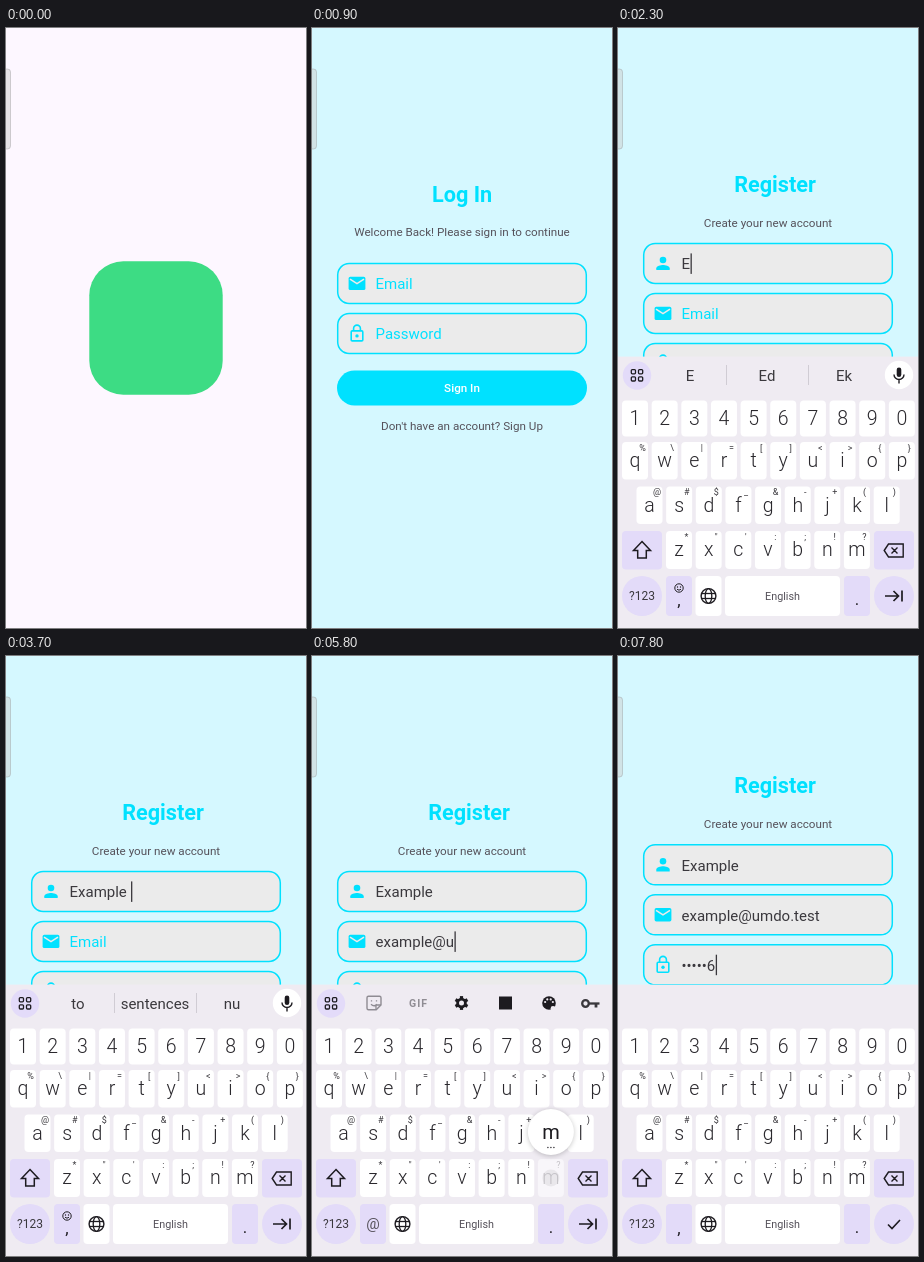
Recreate the animation shown at these times as an HTML page with a canvas. Size 300 px wide and 600 px high, loop 8000 ms.

```html
<!DOCTYPE html>
<html lang="en">
<head>
<meta charset="utf-8">
<title>Sign-up flow</title>
<style>
html, body { margin: 0; width: 100%; height: 100%; overflow: hidden; background: #d5f8ff; }
canvas { display: block; width: 300px; height: 600px; }
</style>
</head>
<body>
<canvas id="stage"></canvas>
<script>
const canvas = document.getElementById('stage');
const c = canvas.getContext('2d');
const dpr = window.devicePixelRatio || 1;
canvas.width = 300 * dpr;
canvas.height = 600 * dpr;

const LOOP = 8000;
const CYAN = '#00e1ff', INK = '#1d1b20', TYPED = '#3a383d', GREY = '#55515a';
const BOARD = '#efebf2', LILAC = '#e3dbf9';
const BOARD_TOP = 328.6;

const ROWS = [
  { keys: '1234567890', hints: '', x: 17, y: 390.3, top: 372.5, h: 36 },
  { keys: 'qwertyuiop', hints: '%\\|=[]<>{}', x: 17, y: 432, top: 414, h: 37.5 },
  { keys: 'asdfghjkl', hints: '@#$_&-+()', x: 31.5, y: 476.6, top: 458.5, h: 37.5 },
  { keys: 'zxcvbnm', hints: '*"\':;!?', x: 61, y: 521, top: 503, h: 38 }
];
const PITCH = 29.65;

// Timed states: [start, value]
const NAME = [[0, ''], [2000, 'E'], [2900, 'Exam'], [3000, 'Examp'], [3400, 'Example ']];
const MAIL = [[0, ''], [4300, 'e'], [4500, 'ex'], [4600, 'exa'], [4800, 'exam'],
  [5000, 'examp'], [5100, 'exampl'], [5200, 'example'], [5500, 'example@'],
  [5800, 'example@u'], [5900, 'example@um'], [6000, 'example@umd'], [6100, 'example@umdo'],
  [6200, 'example@umdo.'], [6300, 'example@umdo.t'], [6400, 'example@umdo.te'],
  [6500, 'example@umdo.test']];
const PASS = [[0, ''], [7100, '1'], [7200, '•2'], [7300, '••'], [7400, '••3'],
  [7500, '•••4'], [7600, '••••5'], [7800, '•••••6']];
const CARET = [[0, -1], [1300, 0], [1500, -1], [1700, 0], [3600, -1], [3700, 0],
  [3900, -1], [4000, 1], [6800, -1], [6900, 2]];
const PRESS = [[0, ''], [1900, 'E'], [2100, ''], [2900, 'p'], [3000, ''], [4200, 'e'], [4300, ''],
  [4400, 'x'], [4500, ''], [4700, 'm'], [4800, ''], [5400, 'a'], [5500, ''], [5600, 'u'],
  [5700, ''], [5800, 'm'], [5900, ''], [6000, 'o'], [6100, ''], [6300, 'e'], [6400, '']];
const STRIP = [[0, 'chip'], [2100, 'E,Ed,Ek'], [2900, 'Exam,Example,Exams'],
  [3400, 'to,sentences,nu'], [4000, 'tools'], [6900, '']];

function at(list, t) {
  let v = list[0][1];
  for (const [start, value] of list) if (t >= start) v = value;
  return v;
}
const clamp = v => Math.max(0, Math.min(1, v));
const ease = v => 1 - Math.pow(1 - clamp(v), 2);

function box(x, y, w, h, r, fill, stroke, lw = 1.5) {
  c.beginPath();
  c.roundRect(x, y, w, h, r);
  paint(fill, stroke, lw);
}
function disc(x, y, r, fill, stroke, lw = 1.5) {
  c.beginPath();
  c.arc(x, y, r, 0, 7);
  paint(fill, stroke, lw);
}
function paint(fill, stroke, lw) {
  if (fill) { c.fillStyle = fill; c.fill(); }
  if (stroke) { c.strokeStyle = stroke; c.lineWidth = lw; c.stroke(); }
}
function line(stroke, lw, ...pts) {
  c.beginPath();
  for (let i = 0; i < pts.length; i += 2) c.lineTo(pts[i], pts[i + 1]);
  paint(null, stroke, lw);
}
function shape(d, x, y, fill, stroke, lw = 1.5) {
  const p = new Path2D(d);
  c.save();
  c.translate(x, y);
  if (fill) { c.fillStyle = fill; c.fill(p); }
  if (stroke) { c.strokeStyle = stroke; c.lineWidth = lw; c.stroke(p); }
  c.restore();
}
function text(s, x, y, size, color, weight = 400, align = 'center') {
  c.font = `${weight} ${size}px Roboto, sans-serif`;
  c.textAlign = align;
  c.fillStyle = color;
  c.fillText(s, x, y + size * 0.355);
}

const fieldIcons = {
  person(x, y) {
    disc(x, y - 3.4, 3.3, CYAN);
    shape('M-6.7 6.7v-1.8c0-2.2 4.4-3.3 6.7-3.3s6.7 1.1 6.7 3.3v1.8z', x, y, CYAN);
  },
  mail(x, y) {
    box(x - 8.4, y - 6.7, 16.8, 13.4, 1.7, CYAN);
    line('#ebebeb', 1.6, x - 7, y - 4.3, x, y + 0.2, x + 7, y - 4.3);
  },
  lock(x, y) {
    box(x - 5.8, y - 2.5, 11.6, 10, 1, null, CYAN, 1.6);
    shape('M-3.4-2.5v-2.4a3.4 3.4 0 0 1 6.8 0v2.4', x, y, null, CYAN, 1.6);
    disc(x, y + 2.5, 1.7, CYAN);
  }
};

function field(y, icon, hint, value, caret) {
  box(25.7, y + 0.5, 248.6, 40, 11.5, '#ebebeb', CYAN);
  const mid = y + 20.9;
  fieldIcons[icon](45, mid - 0.5);
  text(value || hint, 63.5, mid, 15, value ? TYPED : CYAN, 400, 'left');
  if (caret) {
    const x = 64 + c.measureText(value).width;
    c.fillStyle = TYPED;
    c.fillRect(x, mid - 10.5, 1.3, 20.5);
  }
}
function button(y, label) {
  box(25, y, 250, 35, 17.5, CYAN);
  text(label, 150, y + 17.7, 11.67, '#fff', 500);
}

function splash() {
  c.fillStyle = '#fdf7ff';
  c.fillRect(0, 0, 300, 600);
  box(83.3, 233.3, 133.4, 133.4, 34, '#3ddc84');
}
function background() {
  c.fillStyle = '#d5f8ff';
  c.fillRect(0, 0, 300, 600);
}
function login() {
  text('Log In', 150, 166, 21.67, CYAN, 700);
  text('Welcome Back! Please sign in to continue', 150, 204.3, 11.67, GREY);
  field(235, 'mail', 'Email', '');
  field(285, 'lock', 'Password', '');
  button(342.5, 'Sign In');
  text("Don't have an account? Sign Up", 150, 397.5, 11.67, GREY);
}
function register(t) {
  const caret = at(CARET, t);
  c.save();
  c.translate(0, -26.7 * ease((t - 6740) / 160));
  text('Register', 157, 156.5, 21.67, CYAN, 700);
  text('Create your new account', 150, 195, 11.67, GREY);
  field(215, 'person', 'Full name', at(NAME, t), caret === 0);
  field(265, 'mail', 'Email', at(MAIL, t), caret === 1);
  field(315, 'lock', 'Password', at(PASS, t), caret === 2);
  button(372.5, 'Sign Up');
  text('Already have an account? Sign In', 150, 427.5, 11.67, GREY);
  c.restore();
}

function toolIcons() {
  const y = 347, soft = '#8f8c93';
  shape('M-5.5-6.8H5.5Q7-6.8 7-5.3V2L2.2 6.8H-5.5Q-7 6.8-7 5.3V-5.3Q-7-6.8-5.5-6.8z', 62, y, null, soft, 1.4);
  shape('M-3 1.2q3 3 6 0M-2.5-2.8v1.4M2.5-2.8v1.4M2 6.8V2h5', 62, y, null, soft, 1.3);
  c.letterSpacing = '1px';
  text('GIF', 106.5, y + 0.5, 10.5, soft, 700);
  c.letterSpacing = '0px';

  disc(149.5, y, 3.9, null, INK, 2.8);
  for (let i = 0; i < 6; i++) {
    const a = (i + 0.5) * Math.PI / 3, u = Math.cos(a), v = Math.sin(a);
    line(INK, 3.2, 149.5 + 4 * u, y + 4 * v, 149.5 + 6.9 * u, y + 6.9 * v);
  }
  box(187, y - 6.5, 13, 13, 0, INK);

  disc(237, y, 6.8, INK);
  for (let i = 0; i < 4; i++) {
    const a = Math.PI * (1.08 + i * 0.28);
    disc(237 + 4 * Math.cos(a), y + 4 * Math.sin(a), 1.1, BOARD);
  }
  disc(241, y + 5.5, 2.4, BOARD);

  disc(273.5, y + 0.5, 3.3, null, TYPED, 2.3);
  line(TYPED, 2.3, 277, y + 0.5, 287.5, y + 0.5);
  line(TYPED, 2.8, 284, y, 284, y + 4.5);
}

function strip(t) {
  const mode = at(STRIP, t);
  if (!mode) return;
  disc(19, 347.5, 14.2, LILAC);
  for (const dx of [-3.6, 3.6])
    for (const dy of [-3.6, 3.6]) box(16.9 + dx, 345.2 + dy, 4.2, 4.2, 1, null, INK, 1.3);
  if (mode === 'tools') return toolIcons();

  disc(281, 347, 14.2, '#fff');
  box(278.7, 339.5, 4.6, 9.5, 2.3, INK);
  shape('M-5-1a5 5 0 0 0 10 0M0 4v4', 281, 347.5, null, INK, 1.4);

  if (mode === 'chip') {
    const blue = '#12579b';
    box(101, 334, 98, 28, 7, '#dcd8e0');
    disc(115, 348, 6.2, null, blue, 1.4);
    disc(115, 346, 2, null, blue, 1.3);
    shape('M-4 4.3q4-3.4 8 0', 115, 348, null, blue, 1.3);
    text('Nivan Tohal', 128, 348.3, 11.8, TYPED, 400, 'left');
    return;
  }
  if (t >= 3300 && t < 3400) box(110, 333, 78, 29, 7, '#dcd8e0');
  mode.split(',').forEach((word, i) => text(word, 72 + i * 77, 347.5, 15, TYPED));
  for (const x of [108.5, 190.5]) line('#d0ccd4', 1, x, 337, x, 357);
}

function popup(x, y, label) {
  c.save();
  c.shadowColor = 'rgba(0,0,0,.22)';
  c.shadowBlur = 5 * dpr;
  c.shadowOffsetY = dpr;
  disc(x, y, 23, '#fff');
  c.restore();
  text(label, x, y - 0.5, 20, INK);
  for (const dx of [-3, 0, 3]) disc(x + dx, y + 15.5, 0.8, TYPED);
}

function letters(t) {
  const upper = t >= 1700 && t < 2000;
  const press = at(PRESS, t);
  let top = null;
  for (const row of ROWS) {
    [...row.keys].forEach((key, i) => {
      const x = row.x + i * PITCH;
      const down = press && key === press.toLowerCase();
      box(x - 13, row.top, 26, row.h, 4, down ? '#f8f6fa' : '#fff');
      if (down) {
        disc(x, row.y + 1, 8.5, '#e9e7eb');
        top = [x, row.top - 27, t >= 5400 && t < 5500 ? '@' : press];
      }
      text(upper ? key.toUpperCase() : key, x, row.y, 19.5, down ? '#c5c3c8' : '#2a282d', 350);
      if (row.hints) text(row.hints[i], x + 7.5, row.y - 12.3, 9, down ? '#c5c3c8' : TYPED);
    });
  }
  box(4, 503, 40, 38.5, 4, LILAC);
  shape('M0-9L8.5 0H4.3V7.5H-4.3V0H-8.5z', 24, 522.5, upper ? INK : null, INK, 1.5);
  box(256, 503, 40, 38.5, 4, LILAC);
  shape('M-9.8 0L-5.5-6.5H9.2V6.5H-5.5zM-2.5-3L3.5 3M3.5-3L-2.5 3', 276, 522.5, null, INK, 1.4);
  return top;
}

function bottomRow(t) {
  const mail = t >= 4000 && t < 6900, pass = t >= 6900;
  box(4, 548, 40, 40, 20, LILAC);
  text('?123', 24, 568, 12, TYPED);
  box(48, 548, 26, 40, 4, LILAC);
  if (mail) {
    text('@', 61, 567.5, 15, GREY);
  } else {
    text(',', 61, 571.5, 17, INK);
    if (!pass) {
      disc(61, 560, 4.2, null, INK, 1);
      disc(59.5, 559, 0.7, INK);
      disc(62.5, 559, 0.7, INK);
      shape('M-2 1.2q2 2 4 0', 61, 560, null, INK, 1);
    }
  }
  box(77.5, 548, 26, 40, 4, '#fff');
  disc(90.5, 568, 7.4, null, INK, 1.4);
  c.beginPath();
  c.ellipse(90.5, 568, 3.3, 7.4, 0, 0, 7);
  paint(null, INK, 1.3);
  line(INK, 1.3, 84, 565.5, 97, 565.5);
  line(INK, 1.3, 84, 570.5, 97, 570.5);
  box(107, 548, 115, 40, 4, '#fff');
  text('English', 164.5, 568, 10.8, GREY);
  box(226, 548, 26, 40, 4, LILAC);
  text('.', 239, 570.5, 17, INK);
  box(256, 548, 40, 40, 20, LILAC);
  if (pass) line(INK, 1.6, 270, 568.5, 274, 572.5, 282, 564);
  else shape('M-9 0H4.5M-.5-5L4.5 0L-.5 5M8-5.5V5.5', 276, 568, null, INK, 1.7);
}

function keyboard(t) {
  const up = ease((t - 1040) / 160);
  if (up <= 0) return;
  c.save();
  c.translate(0, (600 - BOARD_TOP) * (1 - up));
  c.fillStyle = BOARD;
  c.fillRect(0, BOARD_TOP, 300, 600 - BOARD_TOP);
  strip(t);
  const top = letters(t);
  bottomRow(t);
  if (top) popup(...top);
  c.restore();
}

function draw(t) {
  c.setTransform(dpr, 0, 0, dpr, 0, 0);
  c.globalAlpha = 1;
  const enter = t < 100 ? 0 : clamp((t - 40) / 560);
  const swap = t < 1000 ? 0 : ease((t - 960) / 160);
  if (enter < 1) splash();
  c.globalAlpha = enter;
  background();
  if (swap < 1) {
    c.globalAlpha = enter * (1 - swap);
    login();
  }
  if (swap > 0) {
    c.globalAlpha = swap;
    register(t);
  }
  c.globalAlpha = 1;
  keyboard(t);
  box(-6, 41, 10.5, 80, 3, 'rgba(205,205,205,.5)', 'rgba(150,150,150,.4)', 1);
}

const begin = performance.now();
function tick() {
  draw((performance.now() - begin) % LOOP);
  requestAnimationFrame(tick);
}
tick();
</script>
</body>
</html>
```
